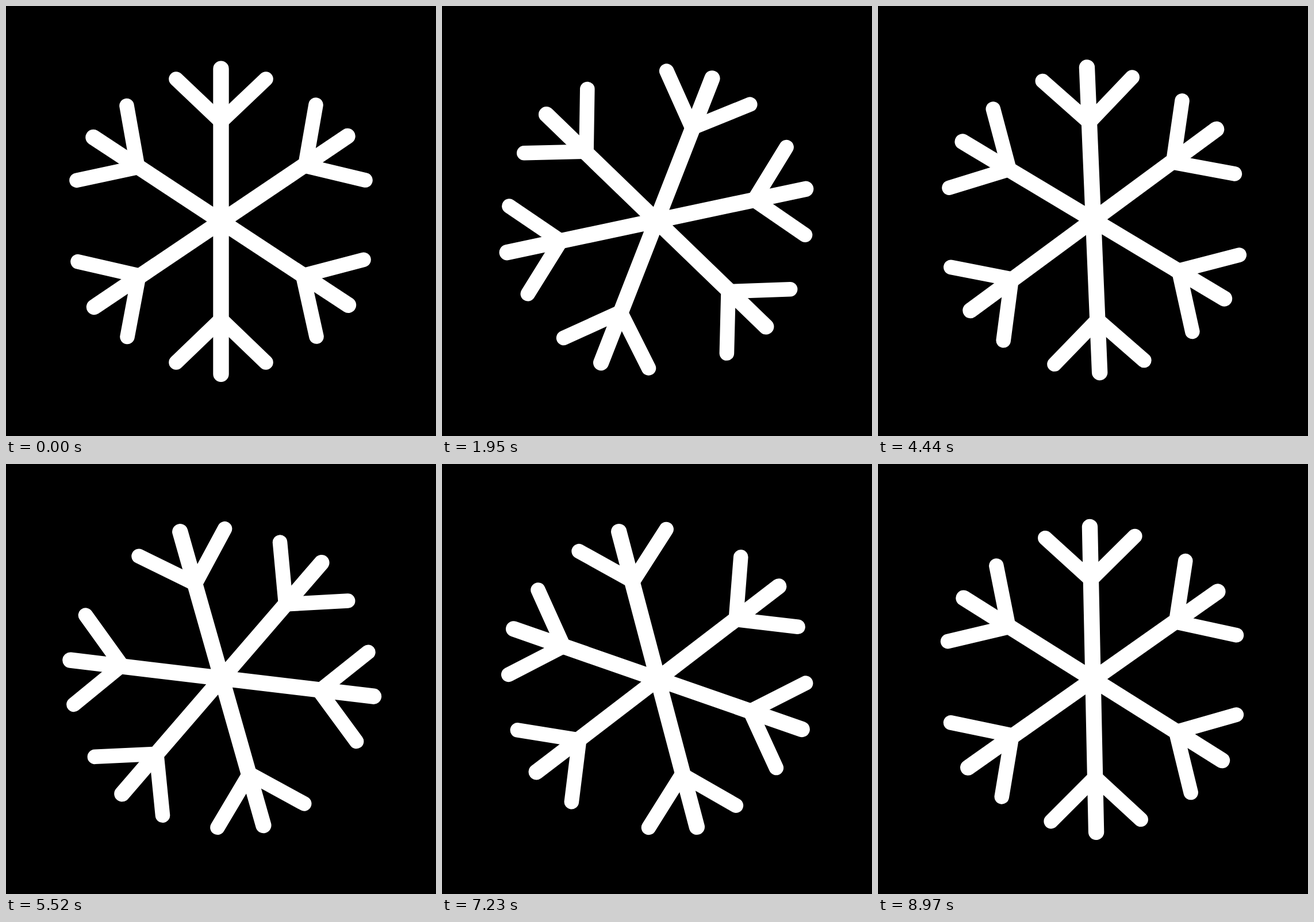
An HTML page for the animation above (9 s loop, 748x748 px).

```html
<!DOCTYPE html>
<html lang="en">
<head>
<meta charset="utf-8">
<title>Spinning snowflake</title>
<style>
  html, body { margin: 0; width: 100%; height: 100%; overflow: hidden; background: #000; }
  svg { display: block; width: 100%; height: 100%; }
  path { fill: none; stroke: #fff; stroke-linecap: round; stroke-linejoin: miter; }
</style>
</head>
<body>
<svg viewBox="0 0 748 748">
  <g id="flake">
    <!-- spines -->
    <path stroke-width="27.4" d="M374 109.3V640.3M594 226.5L153.5 523.5M152 228.5L595.5 520.3"/>
    <!-- forks -->
    <path stroke-width="25.6" d="M296 127L374 201L452 127
      M539 172L520.5 278L625 303
      M622 441.3L516.5 469L540 575
      M452 620L374 545L296 620
      M211 575.5L231 469L125 444.7
      M123 303.3L229 280.5L210 173.5"/>
  </g>
</svg>
<script>
  const LOOP = 9000, STEP = 30;
  const flake = document.getElementById('flake');
  const start = performance.now();

  function draw() {
    const t = (performance.now() - start) % LOOP;
    const angle = Math.floor(t / STEP) * STEP / LOOP * 360;
    flake.setAttribute('transform', `rotate(${angle} 374.3 373.5)`);
    requestAnimationFrame(draw);
  }
  draw();
</script>
</body>
</html>
```
